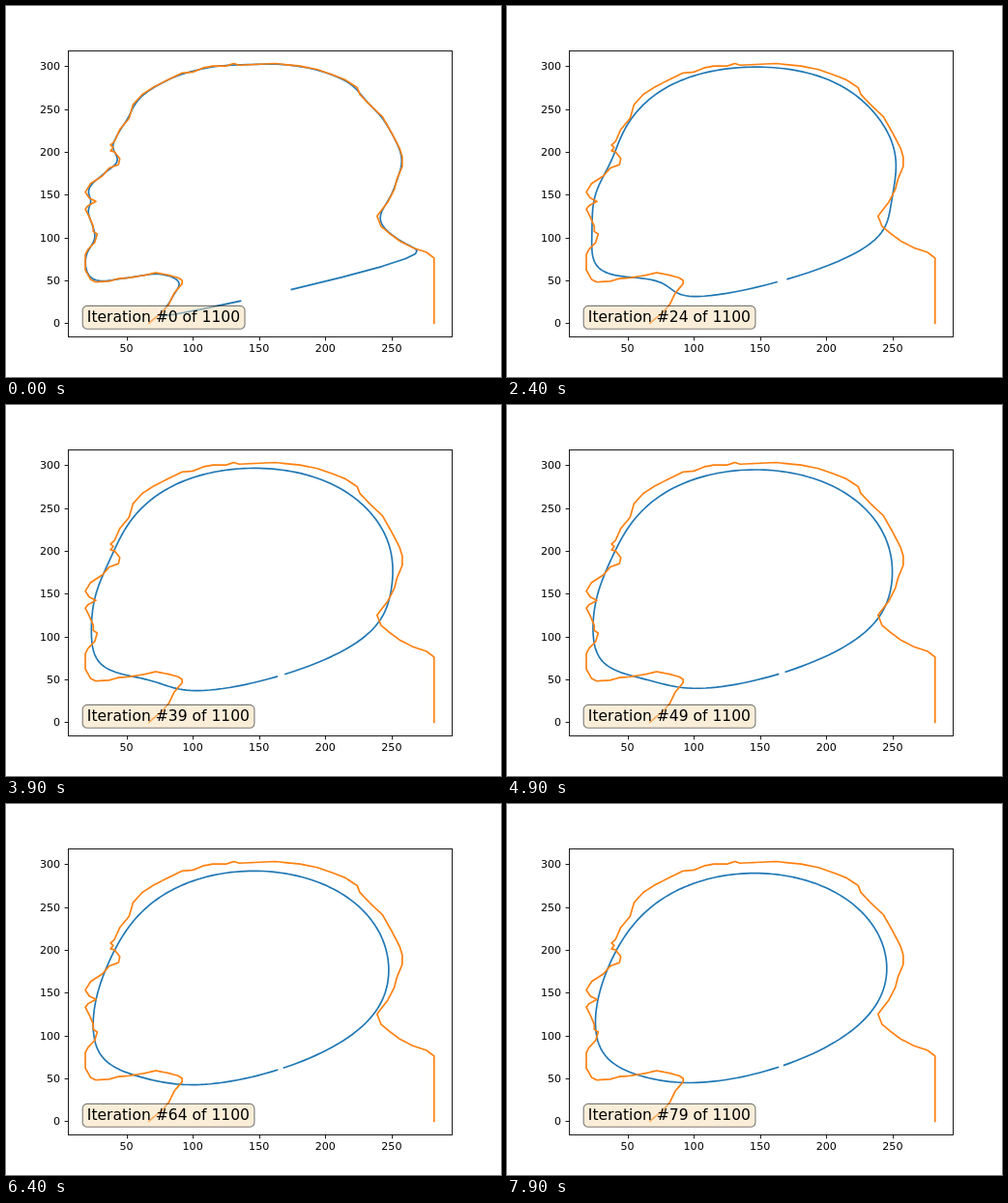
Recreate the animation shown at these times as an HTML page. Size 512 by 384 pixels, loop 8 s.

```html
<!DOCTYPE html>
<html lang="en">
<head>
<meta charset="utf-8">
<title>Curve smoothing</title>
<style>
  html, body { margin: 0; width: 100%; height: 100%; overflow: hidden; background: #fff; }
  svg { display: block; width: 100vw; height: 100vh; }
  text { font-family: "DejaVu Sans", sans-serif; font-size: 11.11px; fill: #000; }
  .axes { fill: none; stroke: #000; stroke-width: .89; }
  .line { fill: none; stroke-width: 1.67; stroke-linejoin: round; stroke-linecap: square; }
  #curve { stroke: #1f77b4; }
  #outline { stroke: #ff7f0e; }
  #box { fill: #f5deb3; fill-opacity: .5; stroke: #000; stroke-opacity: .5; stroke-width: 1.11; }
  #label { font-size: 15.56px; }
</style>
</head>
<body>
<svg viewBox="0 0 512 384">
  <polyline id="curve" class="line"/>
  <polyline id="outline" class="line"/>
  <rect class="axes" x="64.5" y="46.5" width="397" height="296"/>
  <g id="ticks"></g>
  <rect id="box" x="79.2" y="310.4" height="23.8" rx="4.7"/>
  <text id="label" x="83.84" y="326.9"></text>
</svg>
<script>
const STEP_MS = 100, STEPS = 80;
const get = id => document.getElementById(id);

// Data units to stage pixels.
const toX = x => 82.04 + (x - 19) * 1.3716;
const toY = y => 328.3 - y * .8871;
const toPoints = pts => pts.map(([x, y]) => `${toX(x).toFixed(2)},${toY(y).toFixed(2)}`).join(' ');

// Corners of the head in data units, with the sample spacing of each part.
const parts = [
  { spacing: 2.5, corners: '67,0 70,4 77,13 82,22 86,35 92,46' },
  { spacing: 3.2, corners: `92,50 89,53 82,56 72,59 64,56 52,53 44,52 37,49 27,48 23,51 19,62 19,80
    21,86 26,94 28,104 25,107 25,113 22,124 19,133 21,137 27,142 22,146 19,153 23,163 32,172
    37,181 44,185 45,192 41,200 38,201 40,205 38,208 41,212 45,226` },
  { spacing: 4, corners: `52,239 55,255 62,267 70,275 80,283 92,292 100,293 108,298 115,300 125,300
    131,303 135,301 162,303 181,300 194,296 205,290 215,284 224,275 226,267 234,254 243,241 250,222
    256,204 258,194 258,183 254,168 252,156 247,141 239,125 242,113 249,104 256,96 266,88 276,83
    282,76 282,72` }
];

function sampleOutline() {
  const points = [];
  let from = null;
  for (const { spacing, corners } of parts) {
    for (const corner of corners.trim().split(/\s+/)) {
      const to = corner.split(',').map(Number);
      const start = from || to;
      const count = Math.max(1, Math.round(Math.hypot(to[0] - start[0], to[1] - start[1]) / spacing));
      for (let i = 1; i <= count; i++) {
        points.push(start.map((v, k) => v + (to[k] - v) * i / count));
      }
      from = to;
    }
  }
  return points;
}

// Gaussian filter around the closed ring of samples, centred half a sample ahead.
function smooth(points, variance) {
  const size = points.length, reach = Math.ceil(4 * Math.sqrt(variance));
  return points.map((_, i) => {
    let x = 0, y = 0, total = 0;
    for (let k = -reach; k <= reach + 1; k++) {
      const w = Math.exp(-((k - .5) ** 2) / (2 * variance));
      const p = points[(i + k + size) % size];
      x += w * p[0];
      y += w * p[1];
      total += w;
    }
    return [x / total, y / total];
  });
}

function addTicks() {
  const snap = v => Math.round(v) + .5;
  let marks = '';
  for (let v = 50; v <= 250; v += 50) {
    marks += `<path class="axes" d="M${snap(toX(v))} 342.5v3.9"/>
      <text x="${toX(v)}" y="358" text-anchor="middle">${v}</text>`;
  }
  for (let v = 0; v <= 300; v += 50) {
    marks += `<path class="axes" d="M64.5 ${snap(toY(v))}h-3.9"/>
      <text x="56.2" y="${Math.round(toY(v) + 4.1)}" text-anchor="end">${v}</text>`;
  }
  get('ticks').innerHTML = marks;
}

const outline = sampleOutline();
let shown = -1;

// Each iteration widens the filter by the same variance.
function draw(n) {
  if (n === shown) return;
  shown = n;
  get('curve').setAttribute('points', toPoints(smooth(outline, 4.4 + 2.9 * n)));
  get('label').textContent = `Iteration #${n} of 1100`;
  get('box').setAttribute('width', get('label').getComputedTextLength() + 9.6);
}

addTicks();
get('outline').setAttribute('points', toPoints([...outline, [282, 0]]));
draw(0);
const start = performance.now();
function tick() {
  draw(Math.floor((performance.now() - start) / STEP_MS) % STEPS);
  requestAnimationFrame(tick);
}
requestAnimationFrame(tick);
</script>
</body>
</html>
```
